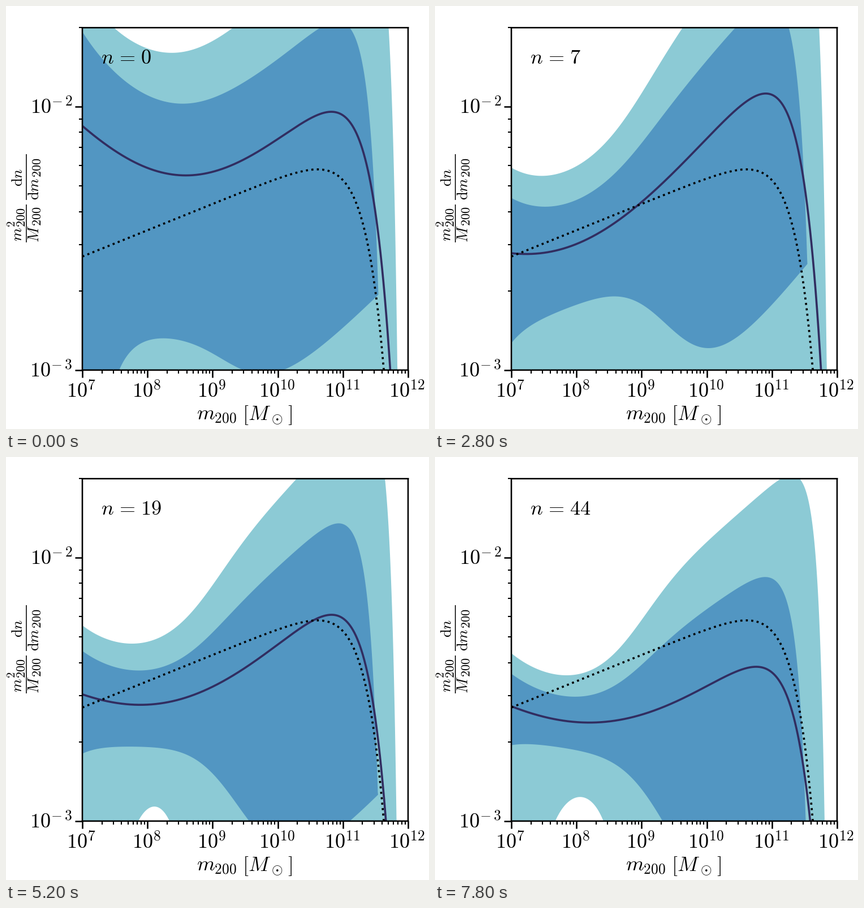
Write a matplotlib script that moves like this. It is 748 by 748 pixels and loops after 8 s.

```python
import numpy as np
import matplotlib.pyplot as plt
from matplotlib.animation import FuncAnimation

plt.rcParams["mathtext.fontset"] = "cm"

# Layout in pixels, y pointing down
SIZE = 748
LEFT, RIGHT, TOP, BOTTOM = 135, 711, 38.3, 643.8
DECADE_X, DECADE_Y = 115.2, 465.5

LIGHT, DARK, LINE = "#8ccad5", "#5296c2", "#312d60"

# Count: falling power law (height, index), rising one (height, index), scatter
KEYS = {
    0: (7.30, 0.285, 1.16, 0.252, 0.77),
    3: (0.82, 0.190, 0.44, 0.345, 0.68),
    7: (1.95, 0.170, 0.83, 0.310, 0.39),
    14: (2.50, 0.225, 0.66, 0.240, 0.34),
    19: (2.38, 0.180, 0.65, 0.265, 0.28),
    30: (2.06, 0.125, 0.66, 0.280, 0.28),
    44: (2.14, 0.185, 0.59, 0.220, 0.18),
}

X = np.arange(LEFT - 4, RIGHT + 4, 0.5)
D = (X - LEFT) / DECADE_X


def height(f):
    return BOTTOM - DECADE_Y * np.log10(np.maximum(f, 1e-3))


def cutoff(body, end, width, sharp):
    """Let a curve drop exponentially so that it leaves the plot at x = end."""
    depth = BOTTOM - np.interp(end, X, body)
    t = (X - end) / width
    return body + depth * ((1 - sharp) * np.exp(t) + sharp * np.exp(2.5 * t))


def curves(n):
    """Median, inner and outer band, each band as (upper, lower) heights."""
    a, p, b, q, s = (np.interp(n, list(KEYS), col) for col in zip(*KEYS.values()))
    f = a * 10**(-p * D) + b * 10**(q * D)
    # Scatter is smallest near one decade and levels off at high mass
    err = (s + (0.11 + 0.55 * s**2) * np.exp(-2 * D)
           + (0.95 - s) / (1 + np.exp((2.1 - D) / 0.37)))
    deficit = (0.2 + 1.15 * err) * (1 + 1.2 * (D - 1.15)**2)
    end = 691 - 0.085 * np.interp(4, D, height(f))

    median = cutoff(height(f), end, 36, 0)
    inner = cutoff(height(f * (1 + 1.06 * err)), 659 + 0.4 * (end - 672), 26, 0.4)
    outer = cutoff(height(f * (1 + (1.9 + 0.3 * D) * err)),
                   691 + 0.2 * (end - 674), 18, 0.4)
    return (median, (inner, height(f * (1 - 0.93 * err))),
            (outer, height(f * (1 - deficit))))


def outline(upper, lower):
    lower = np.minimum(lower, BOTTOM + 3)
    upper = np.minimum(upper, lower)
    return np.r_[np.c_[X, upper], np.c_[X, lower][::-1]]


def count(frame):
    k = max(frame - 7, 0)
    return k if k <= 20 else 2 * k - 20


fig = plt.figure(figsize=(4, 4), dpi=187, facecolor="white")
ax = fig.add_axes([LEFT / SIZE, 1 - BOTTOM / SIZE,
                   (RIGHT - LEFT) / SIZE, (BOTTOM - TOP) / SIZE])
ax.set_xlim(LEFT, RIGHT)
ax.set_ylim(BOTTOM, TOP)


def text(x, y, s, size=14, **kw):
    return fig.text(x / SIZE, 1 - y / SIZE, s, fontsize=size, va="baseline", **kw)


# Axes, ticks and tick labels
logs = np.log10(np.arange(2, 10))
ax.set_xticks(LEFT + DECADE_X * np.arange(6))
ax.set_xticks([LEFT + DECADE_X * (k + f) for k in range(5) for f in logs], minor=True)
ax.set_yticks([BOTTOM, BOTTOM - DECADE_Y])
ax.set_yticks([*(BOTTOM - DECADE_Y * logs), TOP], minor=True)
ax.tick_params(which="major", length=5, width=1, labelbottom=False, labelleft=False)
ax.tick_params(which="minor", length=2.5, width=0.8, labelbottom=False, labelleft=False)
for spine in ax.spines.values():
    spine.set(linewidth=1, zorder=10, snap=False)

for k in range(6):
    text(LEFT + DECADE_X * k - 1.5, 692.5, rf"$10^{{{k + 7}}}$", ha="center")
for k in (2, 3):
    text(117, BOTTOM - DECADE_Y * (3 - k) + 12.5,
         rf"$10^{{-\hspace{{0.15}}{k}}}$", ha="right")

text(337, 732, r"$m_{200}$")
text(507, 732, r"$[M_{\hspace{0.08}\odot}\hspace{0.08}]$", ha="right")


# Vertical label made of two fractions
SUB = 8.6


def upright(x, y, s, size=10.3):
    text(x, y, s, size, rotation=90, rotation_mode="anchor", ha="left")


def bar(y0, y1):
    fig.add_artist(plt.Line2D([36 / SIZE] * 2, [1 - y0 / SIZE, 1 - y1 / SIZE],
                              color="black", lw=0.6, solid_capstyle="butt"))


bar(418, 351)
upright(28, 416, "$m$")
upright(16, 391, "$2$", 8)
upright(34, 391, "$200$", SUB)
upright(58, 418, "$M$")
upright(62, 389, "$200$", SUB)
bar(343, 262)
upright(29, 319, r"$\mathrm{d}n$")
upright(58, 343, r"$\mathrm{d}m$")
upright(62, 303, "$200$", SUB)

# Curves
blank = outline(X * 0 + BOTTOM, X * 0 + BOTTOM)
light = ax.fill(*blank.T, color=LIGHT, lw=0, zorder=1)[0]
dark = ax.fill(*blank.T, color=DARK, lw=0, zorder=2)[0]
median, = ax.plot([], [], color=LINE, lw=1.4, zorder=3)
xs = X[X >= LEFT]
reference = 443 - 0.404 * (xs - LEFT) + 415 * np.exp(0.029 * (xs - 668))
ax.plot(xs, reference, ":", color="black", lw=1.4, zorder=4)
label = text(168, 102, "")


def draw(frame):
    n = count(frame)
    mid, inner, outer = curves(n)
    light.set_xy(outline(*outer))
    dark.set_xy(outline(*inner))
    median.set_data(X, mid)
    label.set_text(rf"$n\hspace{{0.12}}=\hspace{{0.12}}{n}$")
    return light, dark, median, label


anim = FuncAnimation(fig, draw, frames=40, interval=200, repeat=True, repeat_delay=0)
plt.show()
```
